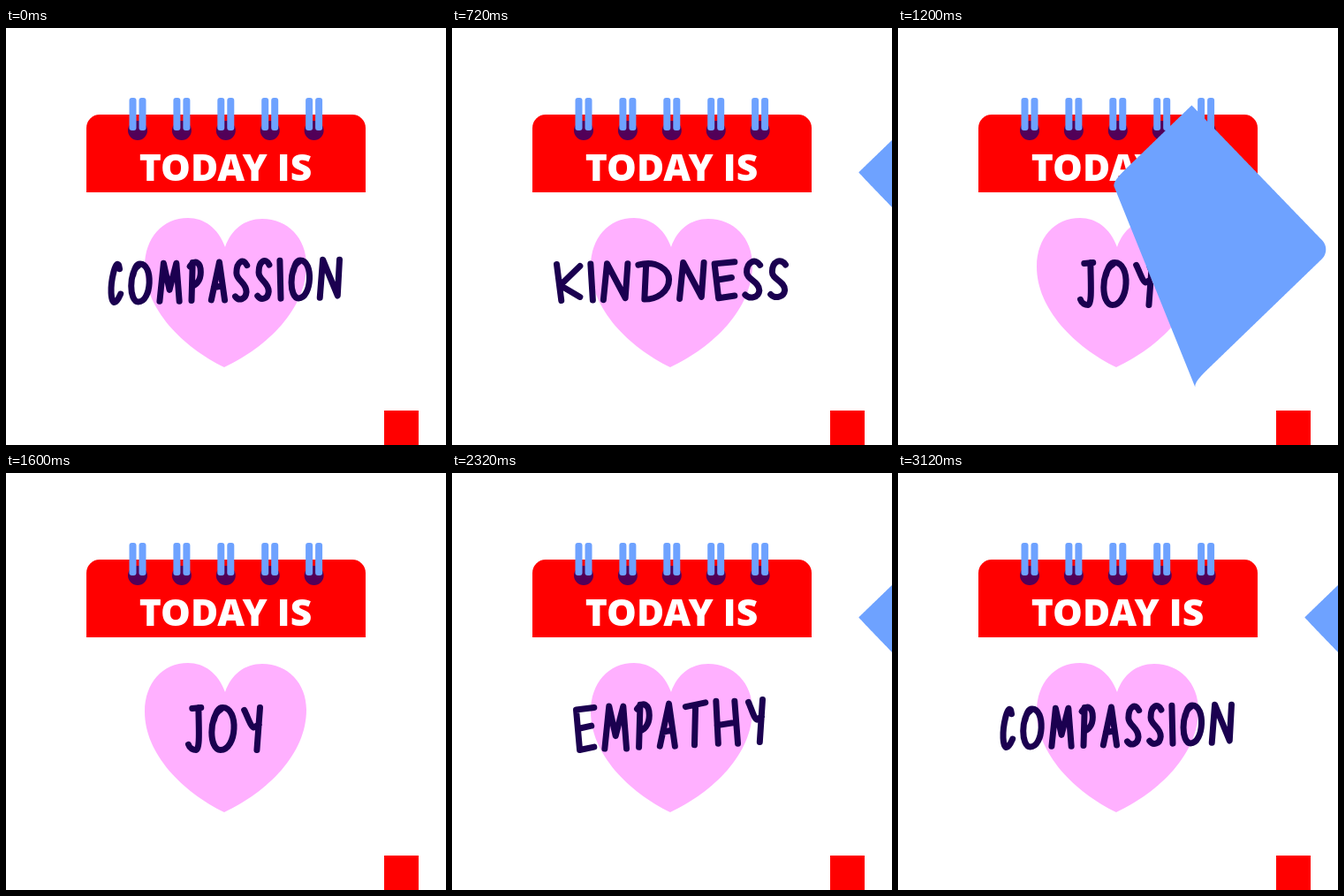
These frames come from a looping animation (498 by 472 pixels, 3200 ms). An HTML page with a canvas:

```html
<!DOCTYPE html>
<html lang="en">
<head>
<meta charset="utf-8">
<title>Today is</title>
<style>
html, body { margin: 0; width: 100%; height: 100%; overflow: hidden; background: #fff; }
canvas { display: block; }
</style>
</head>
<body>
<canvas id="stage" width="498" height="472"></canvas>
<script>
const ctx = document.getElementById('stage').getContext('2d');
const BLUE = '#6ea2ff', RED = '#f00', INK = '#1b0050';
const STEP = 80, TURN = 800, BRUSH = 7, GAP = 5;

// Width of each letter and its brush strokes in a 10 by 10 box
const glyphs = {
  A: [22, 'M0 10L6 0L10 10M2 6.7L8.5 6.2'],
  C: [18, 'M9 1.2C8 -1 5 0 3 2C-1 6 0 10 4 10C6 10 8 9 10 7.8'],
  D: [35, 'M2.5 1L2 10M0 .5C6 -1 10 2 10 4.5C10 8 6 10 2 10'],
  E: [25, 'M10 0L0 .5L2 10L10 9.3M1 5L8.5 4.3'],
  H: [29, 'M0 0L1 10M8.5 0L10 10M.5 5.7L9 5'],
  I: [8, 'M0 0L10 10'],
  J: [18, 'M3 .2L10 0M8 0C8 4 9.5 10 6 10C4 10 1 9.7 0 8.7'],
  K: [28, 'M0 0L2 10M10 .5L1.5 5.8L10 9'],
  M: [29, 'M0 10L2 0L5 7L8.5 0L10 10'],
  N: [29, 'M0 10L1.5 0L9 9.5L10 0'],
  O: [27, 'M4 .5C-1.3 2 -1.3 10 4 10C11.5 10 12.5 0 5 0C3 0 2 1 1 3'],
  P: [19, 'M2.5 0L1.5 10M0 1C5 -1 10 0 10 2.5C10 5 5 6 2 6.2'],
  S: [20, 'M10 1C7 -1 1 0 1 3C1 5 9.5 5.5 9.5 8C9 10 3 10.5 0 9.2'],
  T: [27, 'M0 1L10 0M5 .6L4.5 10'],
  Y: [21, 'M0 .6C2 2 4 4.5 6 4.7L9.3 4M10 0L8 10']
};

// Spreads the letters from left to right; the line rises by `rise`
function word(text, left, right, top, height, rise) {
  const letters = [...text].map(c => glyphs[c]);
  const total = letters.reduce((sum, [w]) => sum + w, 0);
  const scale = (right - left - GAP * (text.length - 1)) / total;
  const path = new Path2D();
  let x = left;
  for (const [w, strokes] of letters) {
    const y = top - rise * (x - left) / (right - left);
    const sx = (w * scale - BRUSH) / 10, sy = (height - BRUSH) / 10;
    path.addPath(new Path2D(strokes), new DOMMatrix([sx, 0, 0, sy, x + BRUSH / 2, y + BRUSH / 2]));
    x += w * scale + GAP;
  }
  return path;
}

const words = [
  word('COMPASSION', 115, 381, 264, 50, 6),
  word('KINDNESS', 115, 381, 264, 48, 4),
  word('JOY', 203, 291, 262, 55, 0),
  word('EMPATHY', 137, 355, 262, 55, 10)
];

const heart = new Path2D('M248 248C240 226 224 215 206 215C177 215 157 238 157 270' +
  'C157 318 200 361 247 384C296 361 340 318 340 268C340 238 319 216 290 216C270 216 255 228 248 248Z');

// Outline of the loose sheet, lower corners rounded
const page = { l: 91, t: 185, r: 407, b: 412.5, round: 15 };
const outline = [];
function line(x0, y0, x1, y1) {
  const n = Math.ceil(Math.hypot(x1 - x0, y1 - y0));
  for (let i = 0; i < n; i++) outline.push([x0 + (x1 - x0) * i / n, y0 + (y1 - y0) * i / n]);
}
function corner(cx, cy, start) {
  for (let i = 0; i <= 12; i++) {
    const a = start + i / 12 * Math.PI / 2;
    outline.push([cx + page.round * Math.cos(a), cy + page.round * Math.sin(a)]);
  }
}
line(page.l, page.t, page.r, page.t);
line(page.r, page.t, page.r, page.b - page.round);
corner(page.r - page.round, page.b - page.round, 0);
line(page.r - page.round, page.b, page.l + page.round, page.b);
corner(page.l + page.round, page.b - page.round, Math.PI / 2);
line(page.l, page.b - page.round, page.l, page.t);

// The sheet rolls over a cylinder whose axis has a fixed slant
const slant = 68 * Math.PI / 180;
const nx = Math.sin(slant), ny = -Math.cos(slant);
const radius = 25;

function drawCurl(edge) {
  const contact = edge + radius;
  ctx.beginPath();
  for (const [x, y] of outline) {
    const at = x * nx + y * ny, rolled = contact - at;
    if (rolled < radius * Math.PI / 2) continue;
    const to = contact + (rolled < Math.PI * radius
      ? -radius * Math.sin(rolled / radius)
      : rolled - Math.PI * radius);
    ctx.lineTo(x + nx * (to - at), y + ny * (to - at));
  }
  ctx.fillStyle = BLUE;
  ctx.fill();
}

// Draws a word on one side of the crease: -1 left, 1 right
function drawWord(path, creaseX, side) {
  const far = 249 + side * 2000;
  const xAt = y => creaseX + (y - 178) / Math.tan(slant);
  ctx.save();
  ctx.beginPath();
  ctx.moveTo(xAt(0), 0);
  ctx.lineTo(xAt(472), 472);
  ctx.lineTo(far, 472);
  ctx.lineTo(far, 0);
  ctx.clip();
  ctx.strokeStyle = INK;
  ctx.lineWidth = BRUSH;
  ctx.lineCap = ctx.lineJoin = 'round';
  ctx.stroke(path);
  ctx.restore();
}

function box(x, y, w, h, r, color) {
  ctx.beginPath();
  ctx.roundRect(x, y, w, h, r);
  ctx.fillStyle = color;
  ctx.fill();
}

function drawCalendar() {
  box(91, 98, 316, 88, [15, 15, 0, 0], RED);
  for (let i = 0; i < 5; i++) {
    const x = 149 + i * 49.9;
    box(x - 11, 105, 22, 22, 11, '#520058');
    box(x - 9.5, 79, 8, 37, 3, BLUE);
    box(x + 1.5, 79, 8, 37, 3, BLUE);
  }
  ctx.fillStyle = '#fff';
  ctx.font = '800 42.5px "Open Sans", sans-serif';
  ctx.textAlign = 'center';
  ctx.fillText('TODAY IS', 248.5, 172.5);
  ctx.fillStyle = '#ffb0ff';
  ctx.fill(heart);
}

function draw(now) {
  const time = Math.floor(now / STEP) * STEP % (TURN * words.length);
  const turn = Math.floor(time / TURN), phase = time % TURN;
  const creaseX = 244 + (phase - 400) * 0.645;
  ctx.fillStyle = '#fff';
  ctx.fillRect(0, 0, 498, 472);
  drawCalendar();
  drawWord(words[(turn + 1) % words.length], creaseX, -1);
  drawWord(words[turn], creaseX, 1);
  drawCurl(creaseX * nx + 178 * ny);
  box(428, 433, 39, 39, 0, RED);
}

const start = performance.now();
function tick() {
  draw(performance.now() - start);
  requestAnimationFrame(tick);
}
tick();
</script>
</body>
</html>
```
